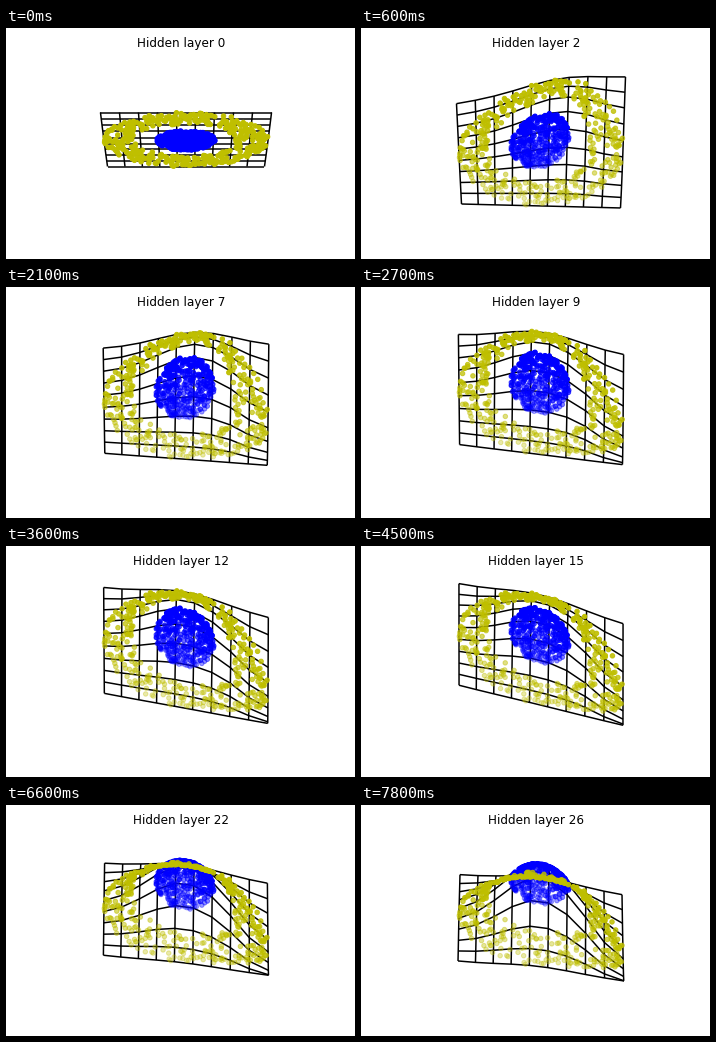
A matplotlib script that plays this animation: 349x231 px, repeating every 8000 ms.

```python
import numpy as np
import matplotlib.pyplot as plt
from matplotlib.animation import FuncAnimation
from matplotlib.collections import LineCollection

W, H, DPI = 349, 231, 64
PT = 72 / DPI  # points per pixel
STEP_MS, STEPS_PER_LAYER, STEPS = 100, 3, 80
YELLOW, BLUE = (0.75, 0.75, 0), (0, 0, 1)


def lift(u, v, layer):
    """Height of the sheet in pixels: a tilted plane, a hump and a dip at the right edge."""
    if layer == 0:
        return np.zeros_like(u)
    early = np.interp(layer, [5, 9], [1, 0])
    shift = 2.5 - 0.12 * (max(layer, 5) - 15) ** 2
    lean_u = np.interp(layer, [5, 9, 15, 22], [5, -10, -20, -10])
    lean_v = np.interp(layer, [5, 26], [30, 16])
    hump = np.interp(layer, [1, 5, 15, 26], [15, 30, 30, 60])
    hump_u, hump_v = 0.25 * early, np.interp(layer, [5, 26], [0.5, 0.05])
    dip = np.interp(layer, [1, 9], [5, 20])

    plane = shift + lean_u * u + lean_v * v + 7 * early * u * v
    bump = hump * np.exp(-((u - hump_u) ** 2 + (v - hump_v) ** 2) / 0.45)
    hollow = dip * (1 - v**2) * (1 - 0.3 * v) * np.exp(-((1 - u) / 0.4) ** 2)
    return plane + bump - hollow


def project(u, v, layer):
    """Screen x, y and distance from the camera, which looks from below."""
    rise = lift(u, v, layer)
    taper = np.interp(layer, [0, 5, 26], [0.043, 0.012, -0.012])
    bow = 1.25 * min(layer, 1) * (1 - u**2) * (1 - v)
    x = 179.5 + 82 * u * (1 + taper * v) - bow
    y = 111 - 27 * v + 1.1 * (1 - v**2) - rise
    return x, y, 0.33 * rise / 170 - 0.427 * v


def ring(rng, count, inner, outer):
    r = np.sqrt(rng.uniform(inner**2, outer**2, count))
    a = rng.uniform(0, 2 * np.pi, count)
    return r * np.cos(a), r * np.sin(a)


rng = np.random.default_rng(4)
ticks = np.linspace(-1, 1, 10)
grid = np.meshgrid(ticks, -ticks)

fig = plt.figure(figsize=(W / DPI, H / DPI), dpi=DPI, facecolor="white")
ax = fig.add_axes([0, 0, 1, 1])
ax.set(xlim=(-0.5, W - 0.5), ylim=(H - 0.5, -0.5))
ax.axis("off")
title = ax.text(174.3, 19, "", ha="center", va="baseline", fontsize=12 * PT,
                family="DejaVu Sans")
wires = LineCollection([], colors="black", linewidths=1.5 * PT, zorder=1)
ax.add_collection(wires)


def make_cloud(color, count, inner, outer, zorder):
    u, v = ring(rng, count, inner, outer)
    dots = ax.scatter(u, v, s=20 * PT**2, linewidths=PT, zorder=zorder)
    return dots, color, u, v


clouds = [make_cloud(BLUE, 350, 0, 0.36, 2), make_cloud(YELLOW, 400, 0.6, 1, 3)]


def place_cloud(dots, color, u, v, layer):
    x, y, depth = project(u, v, layer)
    fade = 0.7 if layer else 0
    alpha = 1 - fade * (depth - depth.min()) / np.ptp(depth)
    order = np.argsort(-depth)
    rgba = np.column_stack([np.tile(color, (len(u), 1)), alpha])[order]
    dots.set_offsets(np.column_stack([x, y])[order])
    dots.set_facecolors(rgba)
    dots.set_edgecolors(rgba)


def draw(step):
    layer = step // STEPS_PER_LAYER
    title.set_text(f"Hidden layer {layer}")
    x, y, _ = project(*grid, layer)
    mesh = np.stack([x, y], axis=-1)
    wires.set_segments([*mesh, *mesh.swapaxes(0, 1)])
    for cloud in clouds:
        place_cloud(*cloud, layer)
    return wires, title, *(cloud[0] for cloud in clouds)


anim = FuncAnimation(fig, draw, frames=STEPS, interval=STEP_MS, repeat=True, repeat_delay=0)
plt.show()
```
